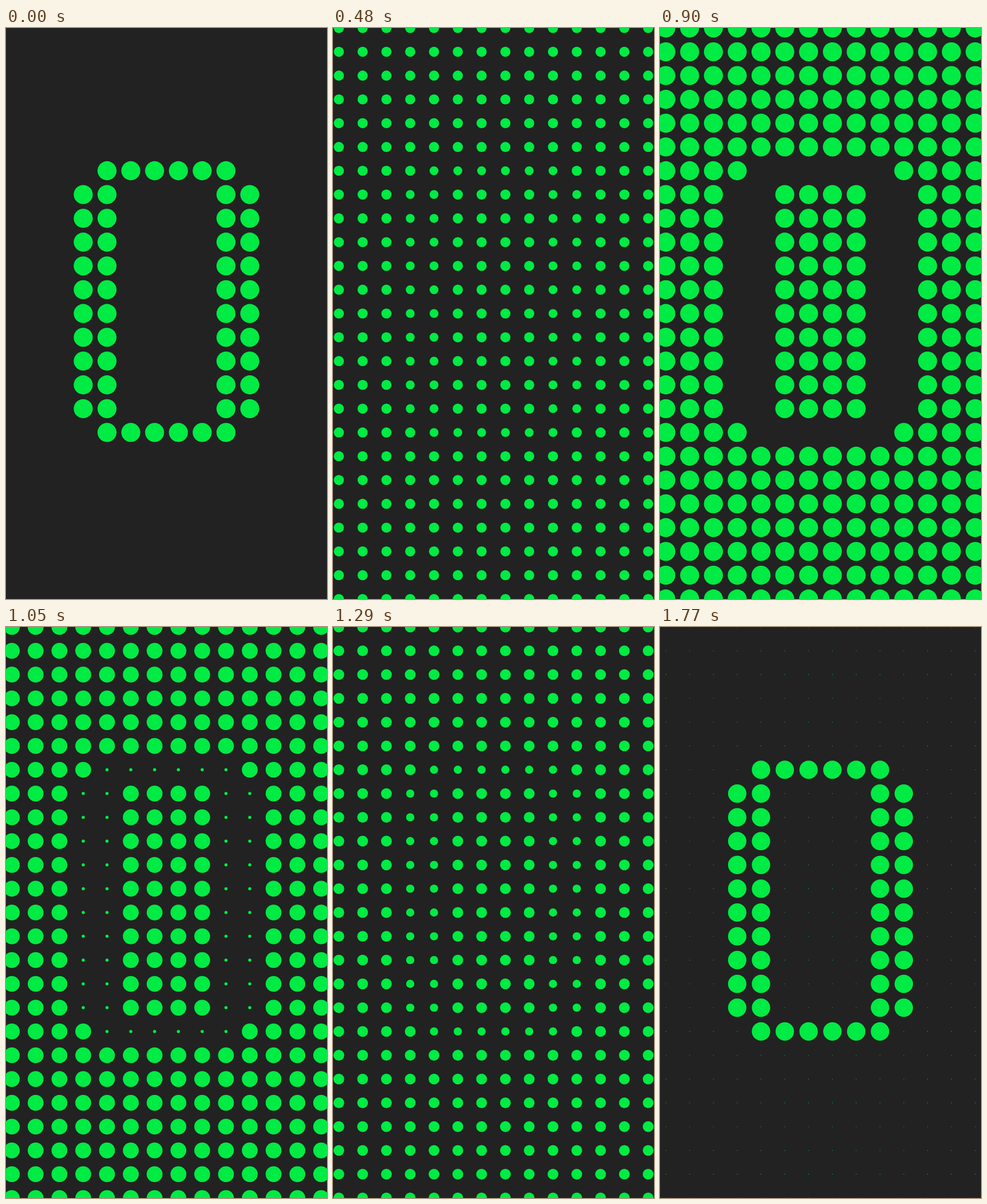
Animation of 561x998 px, one loop 1800 ms. Source, as an HTML page with a canvas:

```html
<!DOCTYPE html>
<html lang="en">
<head>
<meta charset="utf-8">
<title>Dot zero</title>
<style>
  html, body { margin: 0; width: 100%; height: 100%; overflow: hidden; background: #222; }
  canvas { display: block; }
</style>
</head>
<body>
<canvas id="stage" width="561" height="998"></canvas>
<script>
const W = 561, H = 998, LOOP = 1800, STEP = 30;
const COLS = 14, ROWS = 25;
const GAP = H / (ROWS - 1);
const LEFT = W / 2 - GAP * (COLS - 1) / 2;
const MAX_R = GAP * 0.4;
const ctx = document.getElementById("stage").getContext("2d");

// The digit is a two-dot-wide outline with its corners cut.
function inDigit(c, r) {
  if (r === 6 || r === 17) return c >= 4 && c <= 9;
  return r > 6 && r < 17 && (c === 3 || c === 4 || c === 9 || c === 10);
}

function draw(t) {
  const p = 1 - Math.abs(1 - t / (LOOP / 2));
  ctx.fillStyle = "#222";
  ctx.fillRect(0, 0, W, H);
  ctx.fillStyle = "#00eb43";
  for (let r = 0; r < ROWS; r++) {
    for (let c = 0; c < COLS; c++) {
      const size = MAX_R * (inDigit(c, r) ? 1 - p : p);
      if (size <= 0) continue;
      ctx.beginPath();
      ctx.arc(LEFT + c * GAP, r * GAP, size, 0, Math.PI * 2);
      ctx.fill();
    }
  }
}

let start = null;
function tick(now) {
  if (start === null) start = now;
  const t = (now - start) % LOOP;
  draw(Math.floor((t + 0.01) / STEP) * STEP);
  requestAnimationFrame(tick);
}
draw(0);
requestAnimationFrame(tick);
</script>
</body>
</html>
```
